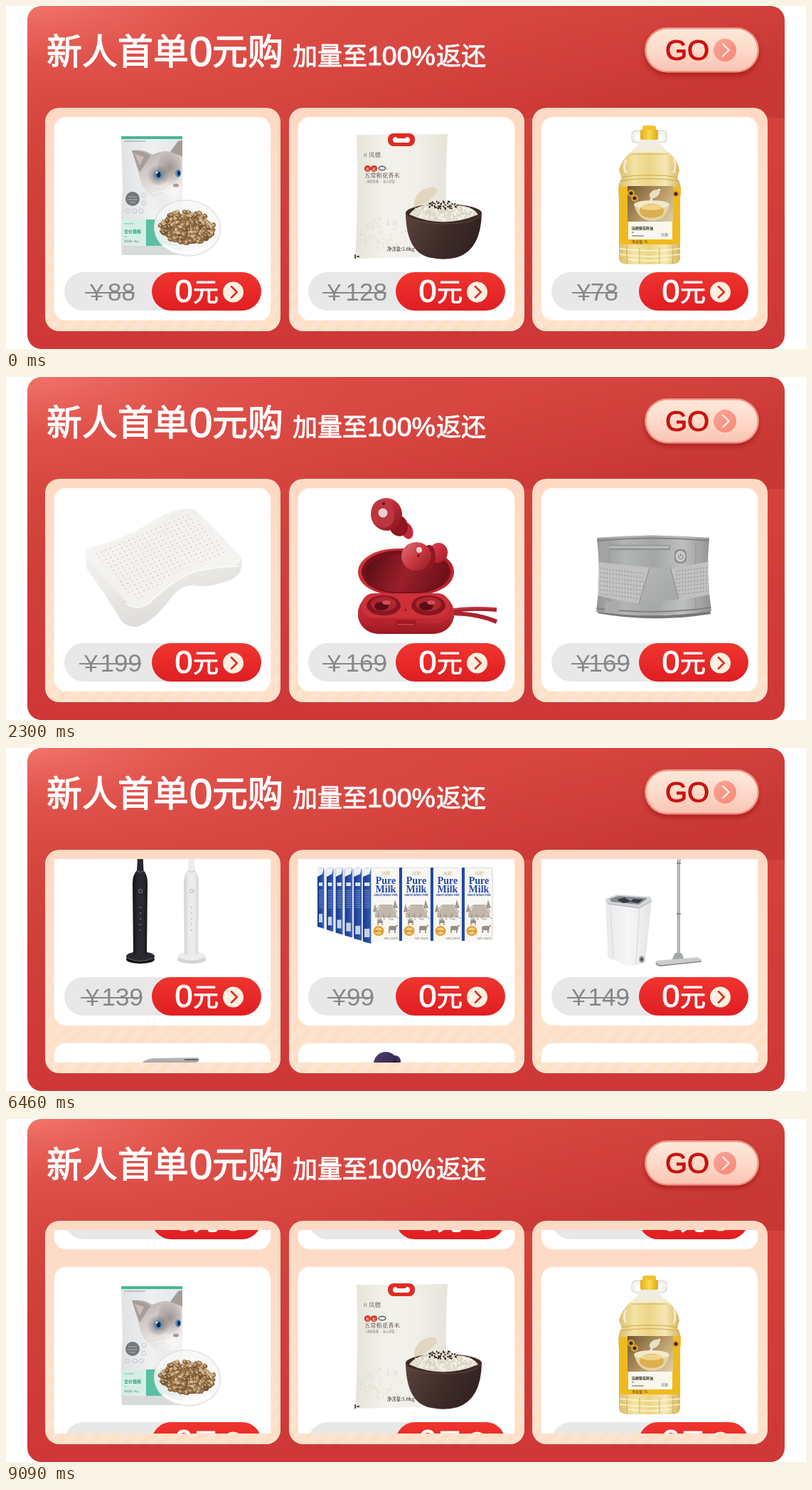
An HTML page with a canvas that plays this animation: 1125x482 px, repeating every 9.19 s.

```html
<!DOCTYPE html>
<html lang="zh">
<head>
<meta charset="utf-8">
<title>新人首单0元购</title>
<style>
html, body { margin: 0; width: 100%; height: 100%; overflow: hidden; background: #fff; }
canvas { display: block; }
</style>
</head>
<body>
<canvas id="stage" width="1125" height="482"></canvas>
<script>
const ctx = document.getElementById('stage').getContext('2d');
const SANS = '"Noto Sans CJK SC", "Noto Sans CJK", sans-serif';
const NUM = '"Liberation Sans", Arial, sans-serif';
const SERIF = '"Noto Serif CJK SC", "Noto Serif", "Noto Sans CJK SC", serif';
const LOOP = 9190, PITCH = 311, STEPS = 6, STEP_MS = 100;
const STARTS = [1800, 4130, 6460, 8690];
const COLS = [0, 343, 685];

// ---------- helpers ----------
function stops(g, colors) {
  colors.forEach((c, i) => g.addColorStop(i / (colors.length - 1), c));
  return g;
}
function grad(x0, y0, x1, y1, ...colors) {
  return stops(ctx.createLinearGradient(x0, y0, x1, y1), colors);
}
function radial(x, y, r, ...colors) {
  return stops(ctx.createRadialGradient(x, y, 0, x, y, r), colors);
}
function fill(d, color) { ctx.fillStyle = color; ctx.fill(new Path2D(d)); }
function line(d, color, w = 1, cap = 'butt') {
  ctx.strokeStyle = color; ctx.lineWidth = w; ctx.lineCap = cap; ctx.lineJoin = 'miter';
  ctx.stroke(new Path2D(d));
}
function ell(x, y, rx, ry, color, rot = 0) {
  ctx.beginPath(); ctx.ellipse(x, y, rx, ry, rot, 0, 7);
  ctx.fillStyle = color; ctx.fill();
}
function box(x, y, w, h, r, color) {
  ctx.beginPath(); ctx.roundRect(x, y, w, h, r);
  ctx.fillStyle = color; ctx.fill();
}
function text(s, x, y, size, color, weight = 400, family = SANS, align = 'left') {
  ctx.font = `${weight} ${size}px ${family}`;
  ctx.textAlign = align; ctx.fillStyle = color;
  ctx.fillText(s, x, y);
}
// medium weight: regular glyphs with a thin outline
function medium(s, x, y, size, color, family = SANS) {
  text(s, x, y, size, color, 400, family);
  ctx.strokeStyle = color; ctx.lineWidth = size * .026; ctx.lineJoin = 'round';
  ctx.strokeText(s, x, y);
}
function clipped(d, draw) {
  ctx.save(); ctx.clip(new Path2D(d)); draw(); ctx.restore();
}
function random(seed) {
  return () => (seed = (seed * 16807) % 2147483647) / 2147483647;
}
// calls put(x, y, rnd) for n points spread over an ellipse
function scatter(n, x, y, rx, ry, seed, put) {
  const rnd = random(seed);
  for (let i = 0; i < n; i++) {
    const a = rnd() * 6.283, r = Math.sqrt(rnd());
    put(x + Math.cos(a) * r * rx, y + Math.sin(a) * r * ry, rnd);
  }
}

// ---------- products ----------
function catFood() {
  const bag = 'M162 183H248V350H163Q160 300 164 255Z';
  fill(bag, grad(162, 0, 249, 0, '#dfe2e5', '#eff0f1', '#e2e4e6'));
  clipped(bag, () => {
    box(162, 183, 87, 4, 0, '#48b694');
    line('M166 190H196', '#8f9a98', 1);
    fill('M177 203Q193 201 206 209Q222 202 231 205L242 190L250 188V272Q225 284 206 268Q190 258 187 236Z',
      grad(195, 200, 235, 275, '#b3adaa', '#cfcac7', '#e6e3e1', '#efefef'));
    fill('M177 203Q192 202 203 211L188 234Z', '#a59e9a');
    fill('M181 208L194 212L188 224Z', '#cdbbb6');
    fill('M231 205L242 190L250 188V212Z', '#a39c98');
    ell(230, 228, 17, 24, radial(230, 228, 24, 'rgba(128,118,114,.7)', 'rgba(128,118,114,0)'));
    ell(214, 238, 16, 14, radial(214, 238, 16, 'rgba(90,82,80,.75)', 'rgba(100,92,90,0)'));
    ell(236, 262, 17, 12, radial(236, 262, 17, '#faf9f8', 'rgba(250,249,248,0)'));
    ell(214, 237, 6.5, 6.5, '#5f8fc4');
    ell(214.5, 237, 3, 4, '#17243b');
    ell(212, 234, 1.5, 1.5, '#fff');
    ell(242, 235, 4, 5.5, '#5a8dc6'); ell(243, 235, 2, 3.5, '#1c2a43');
    ell(239, 252, 4, 2.5, '#b39490');
    line('M232 258L206 263M232 260L212 270', '#fff', .7);
    ell(178, 271, 10, 10, '#74777a');
    line('M172 268H184M171 272H185M174 276H182', '#b5b9ba', .9);
    for (const [x, y] of [[194, 266], [194, 277], [171, 288], [181, 288], [190, 288]]) {
      ctx.strokeStyle = '#b4b8bb'; ctx.lineWidth = .7;
      ctx.beginPath(); ctx.arc(x, y, 3, 0, 7); ctx.stroke();
    }
    box(162, 300, 36, 35, 0, '#d6efe5');
    box(197, 300, 52, 37, 0, '#58c0a1');
    text('全价猫粮', 166, 319, 6, '#2fa481', 700);
    line('M166 306H180M166 324H170', '#73c4aa', 1);
    text('净含量:1.8kg', 166, 332, 3.5, '#67736f');
    box(162, 337, 87, 14, 0, '#d7dadb');
  });
  ell(255, 312, 46.5, 39, 'rgba(248,247,246,.88)', .1);
  ctx.strokeStyle = '#dedede'; ctx.lineWidth = 1.2; ctx.stroke();
  ell(255, 313, 38, 21, '#98774f', .08);
  scatter(190, 255, 311, 38, 23, 41, (x, y, rnd) => {
    const tone = ['#b18d62', '#c7a67b', '#9b764c', '#7d5b38'][rnd() * 4 | 0];
    ell(x, y, 3.6, 2.8, '#6d4f31', .3);
    ell(x - .2, y - .6, 3.4, 2.4, tone, rnd() * 3);
    ell(x - .8, y - 1.1, 1.7, .9, 'rgba(238,214,176,.75)', rnd());
  });
  line('M221 335Q250 357 287 336', '#fff', 3);
}

function riceBag() {
  fill('M493 181L621 180Q618 230 619 280L582 353L491 355Q496 270 493 181Z',
    grad(492, 0, 621, 0, '#e6e4da', '#f3f1eb', '#f1efe8', '#e6e3d9'));
  box(537, 179, 38, 18, 8, '#e12b25');
  box(544, 184, 24, 8, 4, '#fff');
  box(549, 182, 14, 4, 2, '#e12b25');
  text('岚穗', 510, 212, 8.5, '#555', 400, SERIF);
  line('M504 207V212M506.5 207V212', '#777', .8);
  ell(508.5, 228.5, 4.6, 4.6, '#d8342b'); ell(517.5, 228.5, 4.6, 4.6, '#d8342b');
  text('有', 506, 230.5, 5, '#fff'); text('机', 515, 230.5, 5, '#fff');
  ell(529, 228, 5.5, 3.5, '#4c655b'); ell(529, 228, 4, 2, '#e8eee9');
  text('五常稻花香米', 504, 241, 8.3, '#3b3431', 400, SERIF);
  text('｜米粒饱满 · 安心好饭｜', 503, 248, 4.2, '#777');
  fill('M574 275Q578 260 592 256Q608 251 606 263Q590 280 574 284Z', '#e2d6c1');
  scatter(60, 528, 322, 32, 24, 9, (x, y, rnd) => ell(x, y, 3, 1, 'rgba(218,208,182,.3)', rnd() * 3));
  text('净含量:5.0kg', 536, 344, 6.3, '#333', 700, SERIF);
  line('M491 349V355M493 352H497', '#222', 1.5);
  fill('M562 291Q563 349 599 354Q617 358 635 353Q668 342 669 291Z',
    grad(562, 290, 669, 345, '#59433d', '#3f2d29', '#2f1f1d'));
  ell(615.5, 291, 53.5, 13, '#3d2a26');
  fill('M567 293Q577 279 599 279Q617 269 636 280Q657 282 664 293Q615 314 567 293Z', '#e3ddd0');
  scatter(170, 615, 290, 43, 10, 23, (x, y, rnd) =>
    ell(x, y, 2.5, 1.1, rnd() > .45 ? '#f6f3ea' : '#d9d2c3', rnd() * 3));
  scatter(46, 616, 280, 23, 6, 5, (x, y, rnd) => ell(x, y, 1.5, .9, '#2b2320', rnd() * 3));
  line('M562 291Q568 306 615 306Q663 306 669 291', '#5f463e', 1);
}

function oil() {
  box(880, 175, 49, 17, 6, '#f3f3f1');
  ctx.strokeStyle = '#d2d3d0'; ctx.lineWidth = 1.2; ctx.stroke();
  box(886, 180, 37, 9, 3, '#fff');
  box(895, 168, 19, 9, 3, '#f3c32c');
  box(892, 174, 25, 14, 2, grad(892, 0, 917, 0, '#e6ad18', '#fad94d', '#e3a817'));
  const body = 'M892 188H917Q919 196 929 203Q945 216 947 231L944 242Q951 250 948 270V355Q947 363 935 363H875Q862 363 862 354V270Q859 250 866 242L862 231Q865 216 881 203Q890 196 892 188Z';
  fill(body, grad(861, 0, 949, 0, '#d9bd6a', '#f3e3a4', '#ecd486', '#f6e8b4', '#d3b25a'));
  clipped(body, () => {
    box(860, 187, 90, 19, 0, grad(0, 188, 0, 208, '#efeee9', '#f3ecd0'));
    line('M872 216Q867 226 872 235M939 215Q943 225 939 235', 'rgba(255,255,255,.6)', 3);
    line('M880 208H930', '#d2b25f', 1.2);
    line('M863 241Q905 234 947 241M862 246Q905 239 948 246', '#cda849', 1);
    box(862, 254, 87, 81, 0, '#f0ba1e');
    box(874, 253, 64, 50, 0, grad(874, 253, 938, 303, '#6f5636', '#b3935f', '#e3d2a9'));
    for (const [x, y] of [[879, 263], [884, 270], [942, 264]]) {
      ell(x, y, 5, 5, '#dca32c'); ell(x, y, 2.6, 2.6, '#3e2812');
    }
    fill('M883 278H933Q929 302 908 302Q888 301 883 278Z', '#e3d3a8');
    ell(908, 279, 25, 6, '#f3e8ca'); ell(908, 288, 17, 10, '#dcb04c');
    ell(908, 283, 15, 4, '#efd48a');
    line('M905 277Q912 260 920 258', '#eee9dd', 3);
    ell(912, 264, 8, 5, '#e9dfc5', -.6);
    box(875, 303, 62, 25, 0, '#faf7ef');
    text('压榨葵花籽油', 880, 314, 5, '#292015', 700);
    line('M880 318H883M880 323H897', '#5d5448', 1);
    text('岚穗', 921, 323, 5, '#555', 400, SERIF);
    text('净含量: 5L', 880, 333, 5, '#5c430d');
    line('M863 341Q905 347 948 341M863 349Q905 355 948 349M875 356Q905 360 935 356', 'rgba(255,248,211,.75)', 2);
    line('M873 337V362M891 340V362M919 340V362M938 337V362', 'rgba(190,152,52,.35)', 2);
  });
}

function pillow() {
  const top = 'M115 241Q170 226 204 204Q236 183 262 186Q271 190 277 199L328 249Q334 264 318 266Q266 266 238 286Q216 303 199 318Q181 328 169 315L117 259Q109 248 115 241Z';
  fill('M113 246Q180 222 209 203Q242 181 265 186Q276 194 331 254Q334 275 320 283Q290 297 265 293Q247 290 231 312Q206 345 184 351Q173 352 163 344Q139 304 114 270Q111 256 113 246Z',
    grad(200, 225, 230, 345, '#f3f2f0', '#ebe9e6', '#dddbd8'));
  fill(top, grad(130, 190, 260, 310, '#f7f6f4', '#f2f0ed', '#f5f4f2'));
  clipped('M123 245Q180 229 213 207Q239 192 260 193L315 249Q266 259 235 278L193 309Q181 315 173 305Z', () => {
    for (let i = 0; i < 26; i++) for (let j = 0; j < 26; j++)
      ell(118 + i * 6.4 + j * 3.4, 246 - i * 2.7 + j * 5.2, 1, .8, '#c9c1b6');
  });
  line('M169 318Q184 329 201 318Q233 286 266 273Q299 266 326 266', '#fbfaf9', 2);
}

function redBuds() {
  const red = grad(495, 240, 630, 360, '#d43c44', '#b5202b', '#c62e38');
  line('M625 329Q650 324 690 327M628 332Q665 333 690 344', '#a8252f', 6);
  line('M628 327Q655 323 690 325', '#d84851', 1);
  box(495, 241, 135, 66, { x: 54, y: 33 }, red);
  box(500, 244, 125, 60, { x: 50, y: 30 }, '#771019');
  box(505, 250, 115, 52, { x: 46, y: 26 }, grad(510, 255, 610, 300, '#5a0e16', '#9a1f29', '#6d111a'));
  box(495, 304, 135, 57, 28, red);
  fill('M495 326Q500 344 525 346H602Q625 344 630 325V338Q624 361 595 361H530Q501 361 495 338Z', grad(0, 328, 0, 361, '#ca3039', '#9b1722'));
  box(500, 304, 124, 35, 17, '#cd3039');
  for (const x of [531, 594]) {
    ell(x, 321, 24, 14, '#861620'); ell(x, 319, 18, 10, '#b02630');
    ell(x - 3, 322, 10, 6, '#5d0c14'); ell(x + 4, 317, 6, 3, '#d2545b');
  }
  ell(562, 327, 1.5, 1.5, '#8f1620');
  box(548, 342, 29, 9, 3, '#9e1a25'); line('M551 348H574', '#de5961', 1);
  ell(564, 216, 8, 12, '#c22835', -.35); ell(552, 209, 13, 15, '#8f1620', -.3);
  ell(535, 193, 22, 23, grad(514, 172, 554, 215, '#d9545d', '#b92733', '#851821'), -.2);
  ell(530, 192, 16, 20, '#bc3640', -.2);
  ell(531, 178, 1.7, 1.7, '#35080c');
  ell(530, 191, 6.5, 6.5, '#f0cfd0');
  ell(608, 247, 13, 14, grad(595, 235, 622, 260, '#de4450', '#a81623'), .2);
  ell(595, 253, 9, 17, '#8e1822');
  ell(577, 252, 21, 20, grad(557, 235, 598, 270, '#e06c74', '#c83741', '#951b26'));
  ell(581, 243, 4, 4, '#f0cfd0'); ell(580, 251, 1.5, 1.5, '#3b090d');
}

function belt() {
  fill('M834 327Q910 343 990 327L991 333Q910 346 832 332Z', '#777');
  const body = 'M831 226Q910 219 989 226Q984 275 992 329Q910 341 830 330Q837 277 831 226Z';
  fill(body, grad(831, 0, 991, 0, '#969797', '#b3b4b4', '#a5a6a6', '#bebfbf', '#929393'));
  clipped(body, () => {
    line('M831 230Q910 223 989 230M830 325Q910 335 992 324', '#7f8080', 2);
    line('M848 232V329M970 232V329', 'rgba(110,112,112,.4)', 1);
    box(847, 236, 87, 7, 1, '#8d8e8e'); box(848, 237, 85, 4, 1, '#b4b5b5');
    box(834, 232, 14, 30, 2, '#a2a3a3'); box(842, 315, 20, 16, 2, '#aaa');
    fill('M832 260L908 268L897 319Q865 315 832 307Z', '#c0c1c1');
    fill('M990 259L932 270L945 315L992 305Z', '#bfc0c0');
    for (let i = 0; i < 15; i++) for (let j = 0; j < 7; j++) {
      ell(837 + i * 4.2, 269 + j * 6 + i * .5, .7, .9, '#8d8e8e');
      if (i < 12) ell(943 + i * 4.2, 273 + j * 5.5 - i * .5, .7, .9, '#8d8e8e');
    }
    fill('M905 268L934 267L946 312L924 315L919 322L890 319Z', grad(895, 270, 940, 320, '#b4b5b5', '#a5a6a6'));
    line('M905 268L890 319M934 267L946 312', '#8a8b8b', 1);
  });
  box(940, 242, 17, 20, 7, '#888'); ell(948.5, 252, 7, 8, '#c8c9c9');
  line('M948.5 248V252M946 250Q945 256 949 256Q953 255 951 250', '#777', 1);
}

function brush(x, [body, edge, head, shine]) {
  ell(x, 349, 20, 6, edge); ell(x, 345, 20, 7, body);
  line(`M${x - 18} 347Q${x} 356 ${x + 18} 347`, shine, .7);
  fill(`M${x - 3} 190H${x + 3}L${x + 4.5} 224Q${x + 10} 230 ${x + 10} 242L${x + 9} 341Q${x} 348 ${x - 10} 341L${x - 11} 242Q${x - 11} 230 ${x - 5} 224Z`,
    grad(x - 11, 0, x + 11, 0, edge, body, body, edge));
  box(x - 5, 173, 9, 19, 4, body);
  box(x - 4, 175, 7, 13, 3, head);
  for (let i = 0; i < 4; i++) line(`M${x - 3} ${177 + i * 3}H${x + 2}`, 'rgba(255,255,255,.35)', .8);
  line(`M${x - 5} 225Q${x} 228 ${x + 5} 225`, shine, .8);
  ell(x, 253, 3, 3, shine); ell(x, 253, 2, 2, body);
  for (let y = 276; y < 310; y += 8) ell(x, y, 1, 1, shine);
}
function brushes() {
  brush(189, ['#292a2f', '#121317', '#58706d', '#757981']);
  brush(261, ['#ececeb', '#d0d1d0', '#31b98d', '#b5b8b7']);
}

function milk() {
  const blue = '#2349a5';
  for (let i = 0; i < 6; i++) {
    const x = 438 + i * 12.8, w = 9 + i * .5, b = 303 + i * 4.2;
    fill(`M${x} 221L${x + w} 220V${b + 3}L${x} ${b}Z`, grad(x, 0, x + w, 0, '#183987', '#345eb9'));
    fill(`M${x} 221L${x + w} 220L${x + w - 2} 229L${x} 233Z`, '#eef0f4');
    line(`M${x + w + 1} 222V${b + 2}`, '#d3d7df', 2);
    box(x + 2, 241, w - 4, 5, 0, '#d9e0f0');
    for (let y = 252; y < 278; y += 3) line(`M${x + 2} ${y}H${x + w - 2}`, 'rgba(220,229,248,.6)', .8);
    box(x + 2, b - 18, w - 4, 12, 0, '#c6d1e8');
  }
  for (const x of [514, 557, 601, 645]) {
    if (x > 514) box(x - 4, 220, 4, 103, 0, blue);
    fill(`M${x} 220H${x + 39}V322L${x} 325Z`, '#f8f7f3');
    line(`M${x + 39} 221V322`, '#d3d4d3', 1);
    line(`M${x} 220H${x + 39}`, '#dedede', 1);
    text('岚穗', x + 20, 230, 6, '#c5aa69', 400, SERIF, 'center');
    text('Pure', x + 20, 243, 14, blue, 700, '"Liberation Serif", serif', 'center');
    text('Milk', x + 20, 255, 14, blue, 700, '"Liberation Serif", serif', 'center');
    text('Sweet Whole Milk', x + 20, 260, 3.8, blue, 700, SANS, 'center');
    ctx.save(); ctx.translate(x, 0);
    fill('M5 284L13 274H28L35 284V290H5Z', '#c3b6ab');
    line('M3 283L12 273H29L36 283M10 285V291M17 285V291M26 285V291', '#857a71', 1);
    fill('M2 282L5 271L8 282ZM30 277L33 265L37 277Z', '#a39c94');
    scatter(26, 20, 291, 18, 4, 7, (px, py) => ell(px, py, 1.6, .8, '#b4aba2'));
    box(24, 302, 11, 6, 3, '#978c84'); line('M25 307V312M33 307V312M34 303L37 301', '#70655d', 1.2);
    box(8, 294, 8, 4, 2, '#978c84'); line('M9 297V301M15 297V301', '#70655d', 1);
    ell(10, 309, 7.5, 7, '#e69b2f'); ell(10, 309, 5.3, 4.8, '#f7d27a');
    text('纯牛奶', 10, 311, 3.3, '#b76916', 700, SANS, 'center');
    text('Net 250ml', 18, 321, 4, '#796f65');
    ctx.restore();
  }
}

function mop() {
  fill('M843 264L908 265L899 353Q887 359 873 357L849 348Q845 347 846 335Z', grad(843, 0, 908, 0, '#e8e9eb', '#f6f6f7', '#e3e4e6'));
  fill('M843 264L859 258L906 261L908 267L891 277L846 271Z', '#d2d4d7');
  fill('M849 264L861 260L902 263L890 272L851 268Z', '#85898d');
  fill('M859 265L870 262L879 268L868 270ZM882 264L896 265L889 270L878 268Z', '#343b40');
  line('M846 271L891 277L908 267', '#aeb1b5', 1);
  line('M891 278L886 356M850 278L854 346', '#d3d5d8', 1);
  ell(894, 349, 4, 5, '#a5a8ab'); ell(894, 349, 2, 2.5, '#4b4e50');
  box(944, 164, 5, 48, 2, grad(943, 0, 950, 0, '#a4a6a8', '#d8d9da', '#94979a'));
  ell(946, 167, 4, 4, '#d0d2d3'); ell(946, 167, 2, 2, '#fff');
  box(944, 210, 4, 133, 0, grad(944, 0, 948, 0, '#777b80', '#dadcde', '#81858a'));
  line('M943 214H949M943 285H949', '#777', 1.5);
  fill('M941 340H950L954 350H936Z', '#a5a8aa');
  fill('M914 351L972 346Q979 348 978 352L920 359Q911 358 914 351Z', '#caccce');
  line('M914 355L920 358L978 352', '#85898b', 1.5);
}

function kettle() {
  fill('M252 193Q283 187 291 212Q295 240 293 277Q288 282 284 267Q286 235 279 212Q273 200 254 201Z',
    grad(256, 190, 296, 270, '#a6a8ab', '#d3d4d5', '#b1b3b5'));
  fill('M186 214H257Q266 222 266 239L263 343Q262 354 249 357Q221 361 190 356Q179 353 178 343L175 239Q176 221 186 214Z',
    grad(175, 0, 266, 0, '#c6c6c6', '#e4e4e4', '#f4f4f4', '#f3f3f3', '#e6e6e6', '#cdcdce'));
  line('M180 346Q221 359 262 346', '#bebebf', 1.5);
  fill('M171 191L190 193Q219 185 255 193L257 216Q221 223 185 215L183 206Z', grad(175, 0, 257, 0, '#8a8c90', '#b8babd', '#939599'));
  fill('M187 191Q190 179 207 177L270 176Q274 181 268 183L254 184L255 194Q220 198 187 191Z', grad(0, 176, 0, 196, '#b7b9bc', '#85888c'));
  line('M188 193Q220 198 255 193', '#6c6f74', 1);
  line('M251 179H270', '#65686c', 2);
}

function purpleBuds() {
  const dark = grad(507, 230, 622, 364, '#43355f', '#2b2141', '#1d1730');
  box(507, 229, 115, 74, 28, dark);
  box(511, 232, 107, 68, 25, grad(511, 233, 618, 300, '#1c162b', '#2d2341', '#161121'));
  line('M513 255Q514 238 534 234', '#5c4c79', 1.5);
  text('◎  ✕', 541, 269, 8, '#6b5f80', 400);
  for (let y = 263; y < 271; y += 3) line(`M564 ${y}H590`, '#52476a', .8);
  box(504, 300, 118, 64, 29, dark);
  box(507, 300, 112, 37, 18, '#3a2d56');
  for (const x of [536, 594]) {
    ell(x, 316, 22, 14, '#151020'); ell(x, 313, 14, 9, '#30253f');
    line(`M${x - 12} 317L${x - 5} 306M${x + 9} 307V318`, '#cfc6de', 3, 'round');
    ell(x + 1, 321, 8, 5, '#0f0b18');
  }
  line('M506 334Q512 345 532 345H595Q614 345 620 334', '#5c4c79', 1);
  box(561, 350, 9, 2.5, 1, '#f1eef5');
  line('M547 181L532 234', '#3f3059', 16, 'round');
  ell(534, 185, 17, 17, grad(517, 168, 551, 202, '#574470', '#3a2c54', '#281d40'));
  line('M550 184L535 232', '#5a4776', 4, 'round');
  ell(547, 185, 3, 4, '#17111f', .4);
  line('M599 238L609 271', '#483862', 15, 'round');
  ell(594, 228, 19, 20, grad(576, 210, 613, 248, '#5d4972', '#392a52', '#251b38'));
  ell(588, 230, 12, 15, '#2d2140'); ell(597, 227, 5, 7, '#0f0b17');
  line('M605 248L612 272', '#6b5a85', 2);
}

function humidifier() {
  fill('M861 332H888L886 342H866ZM938 334H968L962 341H943Z', '#c4c6c8');
  const body = 'M823 226Q826 207 852 203Q907 198 962 203Q986 207 988 226L994 300Q994 326 970 333Q907 343 843 333Q817 326 818 302Z';
  fill(body, grad(818, 0, 994, 0, '#e0e1e3', '#f4f4f5', '#f8f8f8', '#f3f3f4', '#dcdddf'));
  fill(body, grad(0, 200, 0, 338, 'rgba(255,255,255,.7)', 'rgba(248,248,249,.2)', 'rgba(205,207,210,.45)'));
  line('M957 209Q969 207 979 211', '#c2d5ec', 4);
  line('M819 303Q907 323 994 303', '#d0d2d5', 1);
  line('M867 311V323M890 314V325M940 314V324M957 310V321', '#d0d2d5', 1);
  for (let i = 0; i < 5; i++) box(895 + i * 5.4, 314, 4, 3, 0, '#777');
  text('灯光', 875, 326, 4.5, '#444', 700);
  text('喷雾', 926, 326, 4.5, '#444', 700);
  text('定时', 945, 325, 4.5, '#444', 700);
}

// each entry: product, price, left of the yen sign, end of the price (column-relative)
const ROWS = [
  [[catFood, '88', 118, 181], [riceBag, '128', 109, 192], [oil, '78', 118, 175]],
  [[pillow, '199', 110, 190], [redBuds, '169', 109, 192], [belt, '169', 117, 192]],
  [[brushes, '139', 112, 192], [milk, '99', 116, 174], [mop, '149', 111, 191]],
  [[kettle, '169', 110, 190], [purpleBuds, '139', 116, 198], [humidifier, '199', 111, 188]]
];

// ---------- layout ----------
function background() {
  ctx.clearRect(0, 0, 1125, 482);
  ctx.save();
  ctx.beginPath(); ctx.roundRect(30, 0, 1065, 482, 20); ctx.clip();
  ctx.fillStyle = grad(0, 0, 0, 482, '#d74640', '#d2403b', '#ce3737');
  ctx.fillRect(30, 0, 1065, 482);
  ctx.fillStyle = grad(780, 0, 830, 157, 'rgba(190,43,42,0)', 'rgba(182,37,37,.38)');
  ctx.fillRect(30, 0, 1065, 157);
  ctx.translate(30, -10); ctx.scale(2.8, 1);
  ctx.fillStyle = radial(0, 0, 270, 'rgba(255,140,128,.72)', 'rgba(240,108,98,.36)',
    'rgba(228,86,78,.16)', 'rgba(220,75,68,0)');
  ctx.fillRect(0, 0, 400, 500);
  ctx.restore();
}

function chevron(x, y, s, color, w) {
  line(`M${x - s / 2} ${y - s}L${x + s / 2} ${y}L${x - s / 2} ${y + s}`, color, w);
}

function header() {
  medium('新人首单', 57, 82, 50, '#fff');
  medium('0', 258, 83.5, 58, '#fff', NUM);
  medium('元购', 290, 82, 50, '#fff');
  medium('加量至', 403, 83, 35, '#fff');
  medium('100%', 508, 83, 37.5, '#fff', NUM);
  medium('返还', 605, 83, 35, '#fff');
  ctx.save();
  ctx.shadowColor = 'rgba(150,15,15,.6)'; ctx.shadowBlur = 7; ctx.shadowOffsetY = 4;
  box(898, 30, 161, 63.5, 31.7, '#ee9486');
  ctx.restore();
  box(900.5, 32.5, 156, 58.5, 29, grad(0, 32, 0, 91, '#fee8d9', '#fddaca', '#fbc4b3'));
  medium('GO', 927, 76, 40, '#cb110d', NUM);
  ell(1011, 62, 16, 16, grad(996, 47, 1024, 78, '#f6a697', '#fa8777'));
  chevron(1012, 62, 9, '#fff0e3', 2.4);
}

function frame(x) {
  ctx.save();
  ctx.beginPath(); ctx.roundRect(55 + x, 143, 331, 314, 20); ctx.clip();
  ctx.fillStyle = grad(0, 143, 0, 457, '#fed9c3', '#fddfcb', '#fee4d0');
  ctx.fillRect(55 + x, 143, 331, 314);
  const tint = grad(0, 220, 0, 457, 'rgba(255,220,184,0)', 'rgba(255,217,180,.4)');
  for (let i = -320; i < 340; i += 24) line(`M${55 + x + i} 457l314 -314`, tint, 8);
  ctx.restore();
}

function card(x, [product, price, yen, end]) {
  box(67.5 + x, 155.5, 305, 287, 17, '#fff3e8');
  box(68.5 + x, 156.5, 303, 285, 16, '#fff');
  product();
  box(82 + x, 374, 250, 54, 27, '#e8e8e8');
  text('¥', yen + x, 413.5, 34, '#888', 400, NUM);
  text(price, end + x + 1, 413.5, 35, '#888', 400, NUM, 'right');
  line(`M${yen + x - 7} 403H${end + x}`, '#888', 1.8);
  box(205 + x, 374, 154, 54, 27, grad(0, 374, 0, 428, '#f0352f', '#df1e22'));
  medium('0', 237.5 + x, 416, 45, '#fff', NUM);
  medium('元', 263 + x, 415, 36, '#fff');
  ell(319.5 + x, 402, 14.5, 14.5, '#fff0df');
  chevron(320.5 + x, 402, 8.5, '#d8302b', 2.6);
}

function scrollAt(t) {
  const steps = STARTS.reduce((sum, s) =>
    sum + Math.max(0, Math.min(STEPS, Math.floor((t - s) / STEP_MS) + 1)), 0);
  return steps * PITCH / STEPS;
}

function draw(offset) {
  background();
  header();
  COLS.forEach(frame);
  ctx.save();
  ctx.beginPath(); ctx.rect(66, 156, 992, 286); ctx.clip();
  const first = Math.floor(offset / PITCH);
  for (let row = first; row <= first + 1; row++) {
    ctx.save();
    ctx.translate(0, Math.round(row * PITCH - offset));
    COLS.forEach((x, i) => card(x, ROWS[row % ROWS.length][i]));
    ctx.restore();
  }
  ctx.restore();
}

let shown = -1;
const begin = performance.now();
function tick() {
  const offset = scrollAt((performance.now() - begin) % LOOP);
  if (offset !== shown) draw(shown = offset);
  requestAnimationFrame(tick);
}
tick();
</script>
</body>
</html>
```
